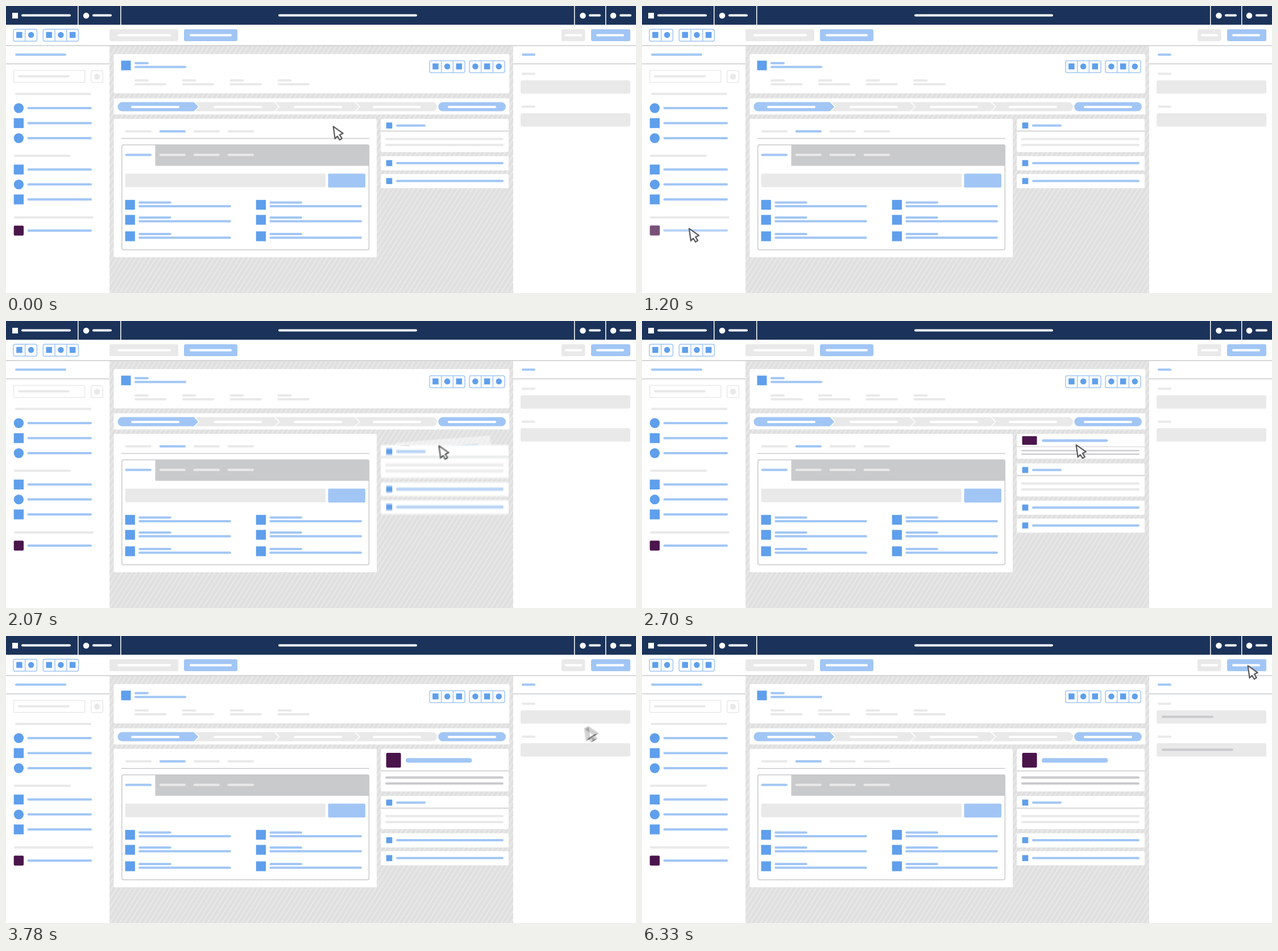
Animation, 1108 px wide and 506 px high, one loop 7200 ms. Source, as an HTML page with a canvas:

```html
<!DOCTYPE html>
<html lang="en">
<head>
<meta charset="utf-8">
<title>Drag a component onto a page</title>
<style>
html, body { margin: 0; width: 100%; height: 100%; overflow: hidden; background: #fff; }
canvas { display: block; }
</style>
</head>
<body>
<canvas id="stage" width="1108" height="506"></canvas>
<script>
const W = 1108, H = 506, LOOP = 7200, STEP = 30, SHUTTER = 15, SAMPLES = 8;
const NAVY = '#1b335a', SKY = '#a1c6f5', BLUE = '#5f9fec', PALE = '#e9e9e9',
      GREY = '#c9cacc', PLUM = '#4a154b', WHITE = '#fff';

const layer = () => Object.assign(document.createElement('canvas'), { width: W, height: H });
const stage = document.getElementById('stage').getContext('2d');
const backdrop = layer(), scene = layer();
let g = backdrop.getContext('2d');

// Shapes
function box(x, y, x2, y2, color, r = 0) {
  g.fillStyle = color;
  g.beginPath();
  g.roundRect(x, y, x2 - x, y2 - y, r);
  g.fill();
}
function frame(x, y, x2, y2, color, r = 3) {
  g.strokeStyle = color;
  g.lineWidth = 1.5;
  g.beginPath();
  g.roundRect(x, y, x2 - x, y2 - y, r);
  g.stroke();
}
function bar(x, x2, y, color, h = 4) { box(x, y - h / 2, x2, y + h / 2, color, h / 2); }
function rule(x, x2, y) { box(x, y - 0.75, x2, y + 0.75, GREY); }
function square(x, y, size, color = BLUE, r = 0) {
  box(x - size / 2, y - size / 2, x + size / 2, y + size / 2, color, r);
}
function dot(x, y, size, color = BLUE) { square(x, y, size, color, size / 2); }
function icon(kind, x, y, size, color) { (kind === 'o' ? dot : square)(x, y, size, color); }
function button(x, x2, color, inset, inset2) {
  box(x, 41, x2, 62, color, 3);
  bar(inset, inset2, 51.5, WHITE);
}
function iconGroup(x, y, kinds) {
  frame(x, y, x + 20.7 * kinds.length, y + 21, SKY);
  [...kinds].forEach((kind, i) => {
    if (i) box(x + 20.7 * i - 0.75, y, x + 20.7 * i + 0.75, y + 21, SKY);
    icon(kind, x + 10.4 + 20.7 * i, y + 10, 10.5);
  });
}

function paintTopBars() {
  box(0, 0, W, 33, NAVY);
  for (const x of [126, 201, 999, 1054]) box(x, 0, x + 1.5, 33, WHITE);
  square(16, 17, 10, WHITE);
  for (const x of [141, 1014.5, 1068]) dot(x, 17, 10.5, WHITE);
  for (const [x, x2] of [[27, 114], [152, 186], [479, 723], [1025, 1046], [1079, 1100]])
    bar(x, x2, 16.5, WHITE);

  iconGroup(13, 41, 'so');
  iconGroup(65.3, 41, 'sos');
  button(182, 303, PALE, 196, 290);
  button(313, 407, SKY, 323, 397);
  button(977, 1018.5, PALE, 983, 1013);
  button(1029, 1098, SKY, 1038, 1087);
  rule(0, W, 69.7);
}

function paintSidebars() {
  bar(16, 106, 85.7, SKY);
  rule(0, 182, 102);
  frame(13.7, 113.5, 138.7, 134.8, PALE, 1);
  bar(21, 112, 124, PALE);
  frame(149.7, 114, 170.3, 135, PALE);
  dot(160, 124.5, 10.5, PALE);
  bar(16, 150, 155, PALE);
  bar(14, 114, 264, PALE);
  bar(14, 154, 372.7, PALE);
  [180, 206.5, 233, 288.3, 314.6, 341].forEach((y, i) => {
    icon('osososo'[i < 3 ? i : i + 0] === 'o' ? 'o' : 's', 22.4, y, 17.4);
    bar(37.5, 151, y, SKY);
  });
  square(22.4, 396, 17.4, PLUM, 2);
  bar(37.5, 151, 396, SKY);

  bar(907, 931, 85.7, SKY);
  rule(892, W, 102);
  for (const y of [119.5, 177.5]) {
    bar(907, 931, y, PALE);
    box(905, y + 11.5, 1098, y + 35, PALE, 3);
  }
}

function paintHatch() {
  box(182, 70.4, 892, H, '#e0e0e0');
  g.save();
  g.beginPath();
  g.rect(182, 70.4, 710, H);
  g.clip();
  g.strokeStyle = '#ececec';
  g.lineWidth = 1.6;
  g.beginPath();
  for (let x = -110; x < 900; x += 8.6) {
    g.moveTo(x, H);
    g.lineTo(x + 270, 70);
  }
  g.stroke();
  g.restore();
}

function paintHeader() {
  box(189.5, 84.7, 885.3, 154, WHITE, 2);
  square(211, 104.8, 17);
  bar(226, 251, 100.8, SKY);
  bar(226, 317, 107.5, SKY);
  for (const x of [226, 309.7, 393.5, 477.5]) {
    bar(x, x + 25, 131.2, PALE);
    bar(x, x + 56.5, 138, PALE);
  }
  iconGroup(745, 96.5, 'sos');
  iconGroup(815, 96.5, 'oso');

  box(189.5, 162.8, 885.3, 191.3, WHITE, 2);
  box(196.5, 169.6, 758, 185.6, PALE, 8);
  g.fillStyle = SKY;
  g.beginPath();
  g.moveTo(331, 169.6);
  g.lineTo(339, 177.6);
  g.lineTo(331, 185.6);
  g.arc(204.5, 177.6, 8, Math.PI / 2, -Math.PI / 2);
  g.fill();
  g.strokeStyle = WHITE;
  g.lineWidth = 1.5;
  for (const x of [331.5, 472.5, 614]) {
    g.beginPath();
    g.moveTo(x - 0.5, 169);
    g.lineTo(x + 8, 177.6);
    g.lineTo(x - 0.5, 186.2);
    g.stroke();
  }
  box(760.3, 169.6, 879, 185.6, SKY, 8);
  for (const x of [220, 365, 506, 645, 777]) bar(x, x + 85, 178, WHITE);
}

function paintMainPanel() {
  const tabs = [210, 270, 330, 390];
  box(189.5, 199, 652, 443, WHITE, 2);
  tabs.forEach((x, i) => bar(x - 0.4, x + 46, 221, i === 1 ? SKY : PALE));
  rule(203, 639, 233.6);
  box(262.5, 244.2, 639, 281.7, GREY, [0, 3, 0, 0]);
  frame(203.8, 244.8, 638.4, 429.8, GREY);
  tabs.forEach((x, i) => bar(x - 0.4, x + 46, 262.6, i ? PALE : SKY));
  box(209.6, 295.5, 562, 319.6, PALE, 2);
  box(566.5, 295.5, 632, 320, SKY, 2);
  for (const x of [218.2, 448.4])
    for (const y of [350.5, 377, 406]) {
      square(x, y, 17.3);
      bar(x + 15, x + 72.5, y - 4, SKY);
      bar(x + 15, x + 177.6, y + 2.6, SKY);
    }
}

// Moving parts
const clamp = v => Math.min(1, Math.max(0, v));
const linear = (t, from, to) => clamp((t - from) / (to - from));
const ease = (t, from, to) => { const u = linear(t, from, to); return u * u * (3 - 2 * u); };

// Each move: start, end, then three control points of a cubic path
const home = [574, 211];
const moves = [
  [10, 940, [410, 271], [245, 391], [81, 391]],
  [1190, 2100, [308, 391], [535, 382], [762, 217]],
  [3320, 3890, [857, 217], [952, 206], [1047, 143]],
  [4520, 4965, [1051, 162], [1054, 180], [1058, 199]],
  [5720, 6330, [1075, 150], [1080, 100], [1064, 51]]
];
const active = [...moves, [1950, 2220], [2690, 3040], [3875, 4355], [4960, 5450]];

function cursorAt(t) {
  let from = home;
  for (const [start, end, a, b, to] of moves) {
    if (t < start) break;
    const u = ease(t, start, end), v = 1 - u;
    from = [0, 1].map(i => v ** 3 * from[i] + 3 * v * v * u * a[i] + 3 * v * u * u * b[i] + u ** 3 * to[i]);
  }
  return from;
}

function paintCursor(x, y) {
  const points = [[1.6, 1.4], [18.8, 13.6], [12.8, 16.2], [16.8, 22.6], [12.8, 25], [8.8, 18.6], [4.6, 23]];
  g.beginPath();
  for (const [dx, dy] of points) g.lineTo(x + dx, y + dy);
  g.closePath();
  g.fillStyle = WHITE;
  g.fill();
  g.strokeStyle = '#58595b';
  g.lineWidth = 2.2;
  g.lineJoin = 'round';
  g.stroke();
}

function paintDragged(t, x, y) {
  const lift = ease(t, 1190, 1500);
  g.save();
  g.globalAlpha = 0.5;
  g.translate(x + 9, y + 4.5);
  g.rotate(-0.077 * lift);
  box(-84, -15, 84, 15, WHITE, 2);
  square(-67.6, 0, 17.4, PLUM, 2);
  bar(-52.5, 61, 0, SKY);
  g.restore();
}

function paintSidePanels(shift) {
  g.save();
  g.translate(0, shift);
  box(659.3, 199, 884, 257.6, WHITE, 2);
  square(674, 210.7, 10.6);
  bar(686, 738, 210.7, SKY);
  rule(659.3, 884, 220.5);
  bar(667, 875, 234.5, PALE);
  bar(667, 875, 245, PALE);
  for (const y of [277, 308.6]) {
    box(659.3, y - 12.3, 884, y + 12.7, WHITE, 2);
    square(674, y, 10.6);
    bar(686, 875, y, SKY);
  }
  g.restore();
}

function paintNewCard(scale) {
  g.save();
  g.translate(0, 199);
  g.scale(1, scale);
  box(659.3, 0, 884, 75, WHITE, 2);
  square(681.6, 20, 26, PLUM, 2);
  bar(703, 819.5, 20.3, SKY, 8);
  rule(659.3, 884, 38.8);
  bar(667, 875, 50.4, GREY);
  bar(667, 875, 61, GREY);
  g.restore();
}

function paintScene(t) {
  const [x, y] = cursorAt(t);
  const drop = linear(t, 2690, 3035);
  g.drawImage(backdrop, 0, 0);
  if (t >= 1190 && t < 2690) paintDragged(t, x, y);
  paintSidePanels(51 * ease(t, 1965, 2215) + 32 * drop);
  if (t >= 2690) paintNewCard(1 - 32 / 75 * (1 - drop));
  const typed = (start, end, width, lineY) => {
    const w = width * ease(t, start, end);
    if (w > 0) bar(914, 914 + w, lineY, GREY);
  };
  typed(3880, 4350, 91, 142.5);
  typed(4965, 5445, 126, 200.5);
  paintCursor(x, y);
}

// Average several moments inside the shutter to blur whatever moves
function render(now) {
  const t = Math.floor(now % LOOP / STEP) * STEP;
  const moving = active.some(([start, end]) => t > start - 10 && t < end + 10);
  const count = moving ? SAMPLES : 1;
  for (let i = 0; i < count; i++) {
    paintScene(t + (moving ? (i / (count - 1) - 0.5) * SHUTTER : 0));
    stage.globalAlpha = 1 / (i + 1);
    stage.drawImage(scene, 0, 0);
  }
  requestAnimationFrame(() => render(performance.now()));
}

box(0, 0, W, H, WHITE);
paintHatch();
paintTopBars();
paintSidebars();
paintHeader();
paintMainPanel();
g = scene.getContext('2d');
render(performance.now());
</script>
</body>
</html>
```
